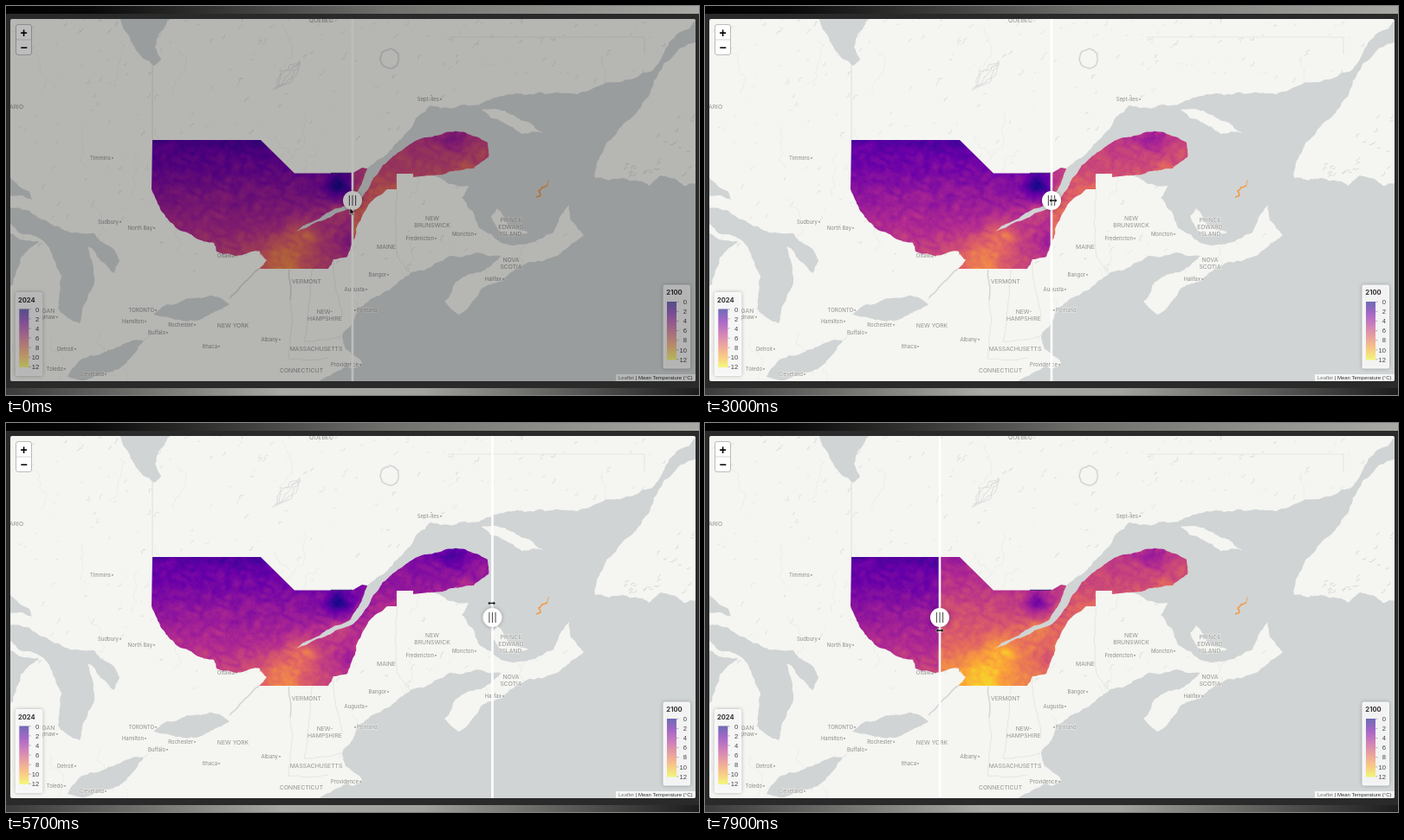
An HTML page with a canvas that plays this animation: 800x450 px, repeating every 8 s.

```html
<!DOCTYPE html>
<html lang="en">
<head>
<meta charset="utf-8">
<title>Mean temperature, 2024 and 2100</title>
<style>
html, body { margin: 0; width: 100%; height: 100%; overflow: hidden; background: #262626; }
#stage { position: relative; width: 800px; height: 450px; overflow: hidden; background: #292a29; --x: 400px; }
.strip { position: absolute; left: 0; width: 100%; }
.top { top: 0; height: 9px; background: linear-gradient(90deg, #000, #080808 12%, #6f6f6c 55%, #a9a9a5); }
.bottom { bottom: 0; height: 8px; background: linear-gradient(90deg, #3a3a39, #a8a8a4 40%, #a2a29e 60%, #1c1c1c); }
#map { position: absolute; inset: 0; clip-path: inset(15px 4px 16px 5px round 2px); }
#map > * { position: absolute; left: 0; top: 0; }
#y2024 { clip-path: inset(0 calc(800px - var(--x)) 0 0); }
#y2100 { clip-path: inset(0 0 0 var(--x)); }
#shade { width: 100%; height: 100%; background: #000; }
text { font-family: Inter, "Open Sans", sans-serif; }
.region { font-size: 6.8px; fill: #929594; text-anchor: middle; stroke: #f5f5f1; stroke-width: 1px; paint-order: stroke; }
.city { font-size: 6px; fill: #8b8e8d; stroke: #f5f5f1; stroke-width: 1px; paint-order: stroke; }
.ui text { font-family: "Liberation Sans", Arial, sans-serif; }
.ui .title { font: 700 7.6px Inter, sans-serif; text-anchor: middle; fill: #333; }
.ui .tick { font-size: 7.6px; text-anchor: end; fill: #444; }
.ui .zoom { font-size: 14px; font-weight: 700; text-anchor: middle; }
.panel { filter: drop-shadow(0 0 2px rgba(0, 0, 0, .3)); }
</style>
</head>
<body>
<div id="stage">
  <div class="strip top"></div>
  <div class="strip bottom"></div>
  <div id="map">
    <canvas id="base" width="800" height="450"></canvas>
    <svg id="labels" width="800" height="450"></svg>
    <canvas id="y2024" width="800" height="450"></canvas>
    <canvas id="y2100" width="800" height="450"></canvas>
    <svg class="ui" width="800" height="450">
      <defs><linearGradient id="ramp" x2="0" y2="1"></linearGradient></defs>
      <g id="slider">
        <rect x="-1.3" y="15" width="2.6" height="420" fill="#fff"/>
        <circle cy="225" r="11" fill="#fff" class="panel"/>
        <path d="M-3.6 219v12M0 219v12M3.6 219v12" stroke="#555" stroke-width="1.1"/>
      </g>
      <rect x="11.5" y="21.5" width="18" height="35" rx="2.5" fill="#fff" stroke="#000" stroke-opacity=".25"/>
      <path d="M12 39h17" stroke="#ccc" stroke-width=".8"/>
      <text class="zoom" x="20.5" y="36">+</text>
      <text class="zoom" x="20.5" y="53">−</text>
      <g id="legends"></g>
      <rect x="704" y="426" width="92" height="9" fill="#fff" opacity=".8"/>
      <text x="707" y="432" font-size="6" fill="#333"><tspan fill="#777">Leaflet</tspan> | Mean Temperature (°C)</text>
      <path id="arrow" d="M0 0v7l2-1.5 1 2.5h1.4l-1.2-3h2.4z" stroke="#fff" stroke-width=".6"/>
      <path id="resize" d="M-4.6 0l2.6-2.5v1.6h4v-1.6l2.6 2.5-2.6 2.5v-1.6h-4v1.6z" stroke="#fff" stroke-width=".5"/>
    </svg>
    <div id="shade"></div>
  </div>
</div>
<script>
const $ = id => document.getElementById(id);
const LAND = '#f5f5f1', WATER = '#d0d4d5', BORDER = '#dddfdc';
const PLASMA = ['#0d0887', '#6a00a8', '#b12a90', '#e16462', '#fca636', '#f0f921'];

let seed = 7;
const rand = () => (seed = seed * 16807 % 2147483647) / 2147483647;

// Splits each side of a polyline at random offsets, for a coast-like edge.
function rough(flat, k = .22) {
  const out = [];
  const split = (a, b) => {
    const dx = b[0] - a[0], dy = b[1] - a[1];
    if (Math.hypot(dx, dy) < 3) return out.push(b);
    const r = (rand() - .5) * k;
    const m = [(a[0] + b[0]) / 2 - dy * r, (a[1] + b[1]) / 2 + dx * r];
    split(a, m);
    split(m, b);
  };
  let last = flat.slice(0, 2);
  out.push(last);
  for (let i = 2; i < flat.length; i += 2) {
    const p = [flat[i], flat[i + 1]];
    split(last, p);
    last = p;
  }
  return out;
}

function trace(ctx, pts) {
  ctx.beginPath();
  pts.forEach(p => ctx.lineTo(p[0], p[1]));
}

function shape(ctx, pts, color) {
  trace(ctx, pts);
  ctx.fillStyle = color;
  ctx.fill();
}

function line(ctx, flat, color, width = 1, k = .1) {
  trace(ctx, rough(flat, k));
  ctx.strokeStyle = color;
  ctx.lineWidth = width;
  ctx.stroke();
}

const northShore = rough([800, 14, 774, 33, 756, 62, 744, 76, 704, 88, 660, 102, 600, 103, 560, 108, 520, 117, 490, 115,
  475, 128, 462, 147, 440, 171, 417, 188]);
const estuary = rough([417, 188, 407, 213, 398, 227, 362, 246, 334, 262, 362, 249, 400, 233, 417, 213, 424, 199], .12);
const gaspe = rough([424, 199, 448, 173, 466, 160, 486, 152, 508, 146, 530, 146, 556, 158, 557, 175, 540, 188, 515, 191,
  488, 196], .15);
const maritimes = rough([488, 196, 512, 206, 534, 208, 526, 222, 548, 258, 572, 274, 604, 274, 632, 262, 650, 230, 652, 248,
  667, 265, 641, 285, 595, 301, 548, 328, 522, 357, 506, 342, 516, 324, 572, 289, 544, 285, 480, 306]);
const atlantic = rough([480, 306, 455, 317, 431, 335, 406, 350, 396, 372, 388, 382, 392, 397, 411, 413, 401, 420, 393, 416,
  350, 436]);
const ocean = [...northShore, ...estuary, ...gaspe, ...maritimes, ...atlantic, [800, 436]];

const southEdge = rough([440, 212, 414, 238, 404, 258, 403, 268, 394, 290, 378, 293, 372, 304], .16);
const westEdge = rough([292, 304, 301, 294, 293, 284, 265, 289, 243, 284, 240, 274, 198, 258, 178, 235, 168, 212], .16);
const province = [[169, 155], [294, 155], [333, 193.5], [400, 193.5], [411, 187], ...estuary, ...gaspe,
  [470, 198], [470, 194], [451, 194], [451, 212], ...southEdge, ...westEdge];

const anticosti = [549, 120, 565, 119, 605, 135, 620, 147, 595, 148, 549, 120];
const pei = [560, 243, 567, 234, 581, 254, 603, 262, 574, 264, 560, 243];
const newfoundland = [800, 40, 772, 56, 738, 108, 710, 140, 683, 179, 680, 199, 742, 208, 756, 196, 782, 208, 800, 204];

const jamesBay = [132, 14, 149, 49, 171, 69, 179, 62, 172, 47, 190, 14];
const ontario = [170, 357, 184, 346, 238, 335, 258, 345, 220, 364, 170, 357];
const erie = [71, 429, 84, 411, 138, 390, 182, 374, 150, 400, 86, 433];
const huron = [0, 232, 102, 263, 131, 294, 125, 309, 94, 278, 101, 324, 85, 367, 60, 350, 64, 312, 45, 274, 0, 245];
const michigan = [0, 262, 38, 272, 18, 290, 8, 322, 0, 330];
const superior = [0, 194, 26, 214, 30, 224, 0, 218];

function drawBase() {
  const c = $('base').getContext('2d');
  c.fillStyle = LAND;
  c.fillRect(0, 0, 800, 450);
  // Scattered small lakes and streams.
  for (let i = 0; i < 330; i++) {
    const x = rand() * 760, y = 15 + rand() ** 1.5 * 300, s = 1 + rand() * 4;
    line(c, [x, y, x + s, y - s * rand() * 1.6], '#dde0df', .5 + rand() * .7, .8);
  }
  for (let i = 0; i < 34; i++) {
    const x = rand() * 700, y = 20 + rand() * 400;
    line(c, [x, y, x + 20 - rand() * 40, y + 50], '#e9eae6', .7, .5);
  }
  for (let i = 0; i < 5; i++)
    line(c, [308 + i * 2, 98 - i, 339, 63 + i], '#d5d9d9', .8, .4);
  line(c, [169, 15, 169, 155], '#d9dbd8', .8, 0);
  line(c, [510, 36, 737, 36, 737, 56], BORDER, .7, 0);
  line(c, [292, 304, 258, 338], '#d3d6d6', 1.6);
  line(c, [327, 305, 328, 340], '#d3d6d6', 1.5);
  line(c, [328, 340, 326, 408, 372, 407], BORDER, .7);
  line(c, [378, 293, 388, 360], BORDER, .7);
  line(c, [354, 304, 344, 388, 386, 382], BORDER, .7);
  line(c, [451, 212, 452, 290, 468, 310], BORDER, .7);
  c.beginPath();
  for (let a = 0; a < 6.5; a += .25)
    c.lineTo(443 + (10 + rand() * 2) * Math.cos(a), 61 + (10 + rand() * 2) * Math.sin(a));
  c.strokeStyle = '#d3d7d7';
  c.lineWidth = 1.7;
  c.stroke();

  shape(c, ocean, WATER);
  [jamesBay, ontario, erie, huron, michigan, superior].forEach(l => shape(c, rough(l), WATER));
  [anticosti, pei, newfoundland].forEach(l => shape(c, rough(l), LAND));
  for (let i = 0; i < 28; i++) {
    const x = 712 + rand() * 82, y = 198 - rand() * (x - 700);
    line(c, [x, y, x + 4, y - 5 * rand()], '#d8dbdb', 1, .8);
  }
  line(c, [612, 221, 617, 219, 615, 214, 625, 208], '#f39a45', 1.6, .3);
  line(c, [625, 208, 627, 201], '#f39a45', .8, .2);
}

// Warm and cold spots: x, y, radius, share of the colour ramp.
const spots = [
  [318, 294, 30, .2], [346, 262, 18, .18], [384, 240, 16, .12], [383, 207, 15, -.23],
  [395, 275, 16, -.07], [515, 154, 17, -.09], [530, 192, 15, .06], [552, 162, 12, .06]
];

const hash = (x, y) => {
  const s = Math.sin(x * 127.1 + y * 311.7) * 43758.5453;
  return s - Math.floor(s);
};
const ease = u => u * u * (3 - 2 * u);
function noise(x, y) {
  const i = Math.floor(x), j = Math.floor(y), u = ease(x - i), v = ease(y - j);
  const a = hash(i, j), b = hash(i + 1, j), c = hash(i, j + 1), d = hash(i + 1, j + 1);
  return a + (b - a) * u + (c - a + (a - b - c + d) * u) * v;
}

function heat(x, y) {
  let v = .16 + (y - 155) * .0024 + .09 * ease(Math.min(1, Math.max(0, (x - 400) / 30)));
  for (const [sx, sy, r, gain] of spots)
    v += gain * Math.exp(-((x - sx) ** 2 + (y - sy) ** 2) / (r * r));
  const p = x + y * .6, q = y - x * .4;
  const ridge = Math.abs(noise(p / 13, q / 9) - .5) - .22;
  return v + ridge * .14 + (noise(x / 5, y / 5) - .5) * .05 + (noise(x / 1.8, y / 1.8) - .5) * .035;
}

const rgb = PLASMA.map(h => [1, 3, 5].map(i => parseInt(h.substr(i, 2), 16)));
function plasma(v) {
  const p = Math.min(.999, Math.max(0, v)) * 5, i = Math.floor(p);
  return rgb[i].map((c, n) => c + (rgb[i + 1][n] - c) * (p - i));
}

function drawHeat() {
  const x0 = 165, y0 = 142, w = 396, h = 166;
  const layers = [['y2024', 0], ['y2100', .2]].map(([id, rise]) => {
    const ctx = $(id).getContext('2d');
    return { ctx, rise, img: ctx.createImageData(w, h) };
  });
  for (let i = 0; i < w * h; i++) {
    const v = heat(x0 + i % w, y0 + Math.floor(i / w));
    layers.forEach(l => l.img.data.set([...plasma(v + l.rise), 255], i * 4));
  }
  layers.forEach(({ ctx, img }) => {
    ctx.putImageData(img, x0, y0);
    ctx.globalCompositeOperation = 'destination-in';
    shape(ctx, province, '#000');
    ctx.globalCompositeOperation = 'source-over';
    line(ctx, [375, 193.3, 400, 193.3], '#2a0a70', 1, 0);
  });
}

const regions = [['QUÉBEC', 364, 19], ['ONTARIO', 5, 119], ['NEW', 492, 248], ['BRUNSWICK', 492, 256], ['PRINCE', 583, 250],
  ['EDWARD', 583, 258], ['ISLAND', 583, 266], ['NOVA', 583, 296], ['SCOTIA', 583, 304], ['MAINE', 439, 281],
  ['VERMONT', 347, 321], ['NEW-', 368, 356], ['HAMPSHIRE', 368, 364], ['MASSACHUSETTS', 358, 399], ['CONNECTICUT', 341, 424],
  ['NEW YORK', 262, 372], ['MICHIGAN', 39, 355]];
// Text and the place of the dot that ends it.
const cities = [['Timmins', 123, 178], ['Sudbury', 132, 252], ['North Bay', 171, 259], ['Sept-Îles', 502, 110],
  ['Fredericton', 496, 271], ['Moncton', 542, 266], ['Halifax', 574, 318], ['Bangor', 441, 313], ['Augusta', 416, 330],
  ['Albany', 316, 388], ['Ithaca', 246, 396], ['Rochester', 218, 371], ['Buffalo', 186, 380], ['Hamilton', 161, 367],
  ['TORONTO', 173, 354], ['Detroit', 80, 399], ['Toledo', 68, 422], ['Cleveland', 115, 428], ['Providence', 409, 417],
  ['Ottawa', 266, 291], ['Saginaw', 59, 362]];

const text = (cls, s, x, y, extra = '') => `<text class="${cls}" x="${x}" y="${y}" ${extra}>${s}</text>`;
const dot = (x, y) => `<circle cx="${x}" cy="${y - 2.2}" r=".9" fill="#8b8e8d"/>`;
$('labels').innerHTML =
  regions.map(r => text('region', ...r)).join('') +
  cities.map(([s, x, y]) => text('city', s, x - 2, y, 'text-anchor="end"') + dot(x, y)).join('') +
  text('city', 'Portland', 405, 354) + dot(403, 354) + text('city', 'Montréal', 293, 288);

$('ramp').innerHTML = PLASMA.map((c, i) => `<stop offset="${i / 5}" stop-color="${c}"/>`).join('');
function legend(year, x, y) {
  let s = `<rect class="panel" x="${x}" y="${y}" width="31.5" height="97" rx="2.5" fill="#fff" fill-opacity=".88"/>` +
    text('title', year, x + 13, y + 11.5) +
    `<rect x="${x + 4.5}" y="${y + 19.5}" width="11" height="67.5" fill="url(#ramp)" opacity=".58"/>`;
  for (let i = 0; i < 7; i++) {
    const ty = y + 19.8 + i * 11.1;
    s += `<path d="M${x + 15.5} ${ty}h2.5" stroke="#777" stroke-width=".5"/>` + text('tick', i * 2, x + 27.5, ty + 2.7);
  }
  return s;
}
$('legends').innerHTML = legend(2024, 10.8, 331) + legend(2100, 758.5, 322.5);

drawBase();
drawHeat();

const slide = [[3300, 400], [4300, 463], [5000, 561], [5400, 583], [6300, 468], [7900, 271]];
const reach = [[2700, -3], [3000, 2], [3300, 1], [6300, -1], [7900, 0]];
const height = [[2700, 234], [3000, 225], [3300, 225], [4300, 221], [5000, 207], [5400, 206], [6300, 219], [7900, 240]];

// Smooth curve through timed keys, flat at the ends and at turning points.
function curve(keys, t) {
  const n = keys.length - 1;
  if (t <= keys[0][0]) return keys[0][1];
  if (t >= keys[n][0]) return keys[n][1];
  const slope = i => {
    if (i < 1 || i >= n) return 0;
    const [a, b, c] = [keys[i - 1], keys[i], keys[i + 1]];
    return (b[1] - a[1]) * (c[1] - b[1]) > 0 ? (c[1] - a[1]) / (c[0] - a[0]) : 0;
  };
  const i = keys.findIndex(k => k[0] > t) - 1;
  const [t0, a] = keys[i], [t1, b] = keys[i + 1], d = t1 - t0, u = (t - t0) / d;
  return a + (b - a) * ease(u) + d * u * (1 - u) * (slope(i) * (1 - u) - slope(i + 1) * u);
}

function render(now) {
  const t = Math.floor(now % 8000 / 100) * 100;
  const x = curve(slide, t), at = `translate(${x + curve(reach, t)} ${curve(height, t)})`;
  $('stage').style.setProperty('--x', x + 'px');
  $('slider').setAttribute('transform', `translate(${x} 0)`);
  const dragging = t >= 2900;
  $('arrow').setAttribute('transform', at);
  $('resize').setAttribute('transform', at);
  $('arrow').style.display = dragging ? 'none' : '';
  $('resize').style.display = dragging ? '' : 'none';
  $('shade').style.opacity = Math.max(0, .26 * (1 - t / 400));
}

const start = performance.now();
function loop() {
  render(performance.now() - start);
  requestAnimationFrame(loop);
}
render(0);
loop();
</script>
</body>
</html>
```
